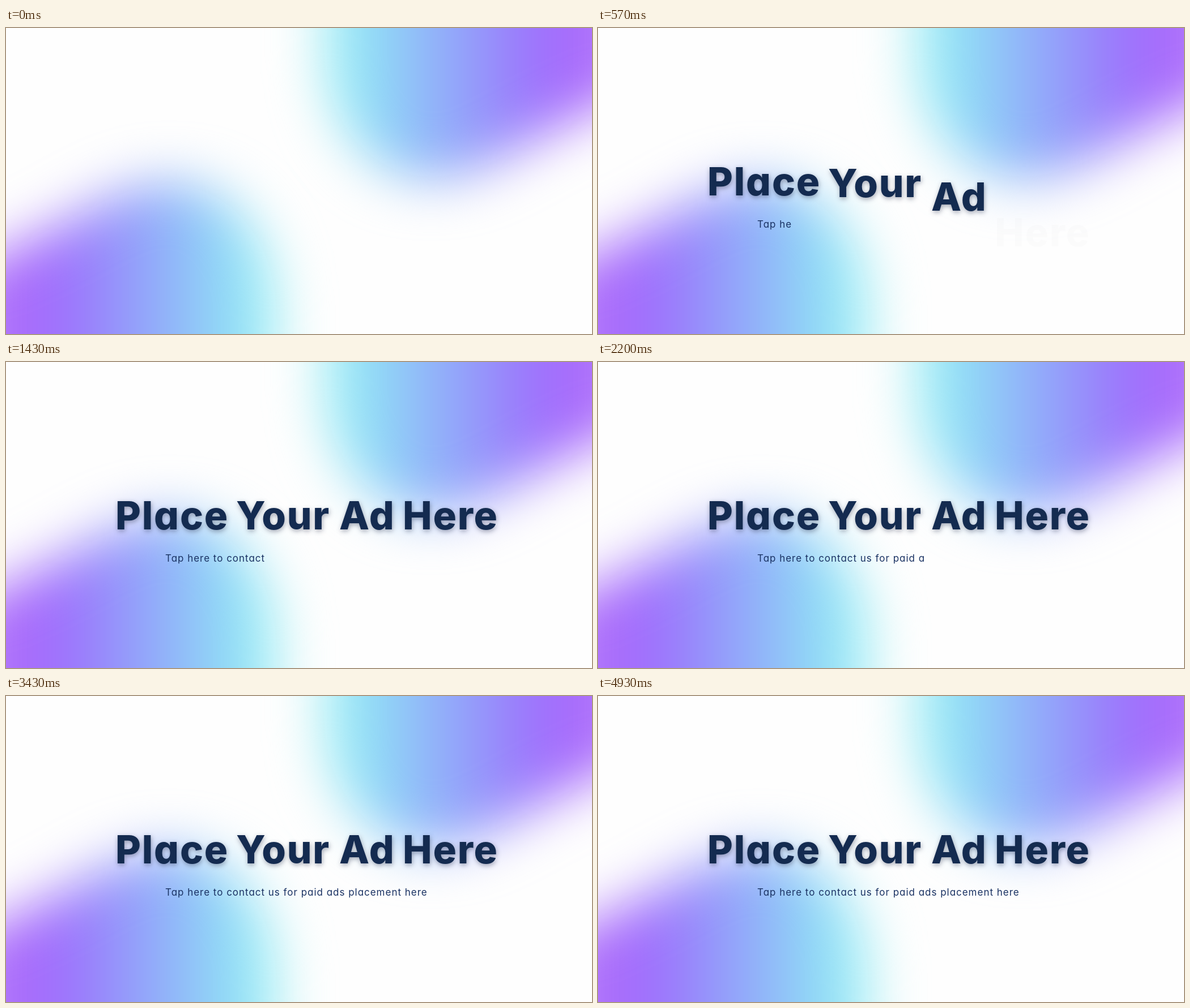
An HTML page without scripts that plays this animation: 1034 by 541 pixels, repeating every 5 s.

```html
<!DOCTYPE html>
<html lang="en">
<head>
<meta charset="utf-8">
<title>Place Your Ad Here</title>
<style>
  /* Elapsed milliseconds; every moving part is derived from it. */
  @property --clock { syntax: "<number>"; inherits: true; initial-value: 0; }
  @keyframes tick { to { --clock: 5000; } }

  html, body { margin: 0; width: 100%; height: 100%; overflow: hidden; background: #fefefe; }
  svg { display: block; width: 1034px; height: 541px; animation: tick 5s linear infinite; }
  text { font-family: Inter, "Open Sans", sans-serif; font-feature-settings: "cv11"; }

  .headline text {
    --progress: clamp(0, (var(--clock) - 120 - 150 * var(--n)) / 450, 1);
    --rest: (1 - var(--progress));
    font-size: 69px; font-weight: 800; letter-spacing: 1.8px; fill: #142b50;
    filter: drop-shadow(1px 3px 4px rgb(20 30 60 / .38));
    transform: translateY(calc(91px * var(--rest) * var(--rest) * var(--rest)));
    opacity: calc(4 * var(--progress));
  }

  .caption { font-size: 17px; letter-spacing: .97px; fill: #1a3263; }
  .caption tspan tspan {
    fill-opacity: clamp(0, var(--clock) - 260 - 60 * (var(--start) + var(--i)), 1);
  }
  .caption tspan :nth-child(1) { --i: 0; }
  .caption tspan :nth-child(2) { --i: 1; }
  .caption tspan :nth-child(3) { --i: 2; }
  .caption tspan :nth-child(4) { --i: 3; }
  .caption tspan :nth-child(5) { --i: 4; }
  .caption tspan :nth-child(6) { --i: 5; }
  .caption tspan :nth-child(7) { --i: 6; }
  .caption tspan :nth-child(8) { --i: 7; }
  .caption tspan :nth-child(9) { --i: 8; }
</style>
</head>
<body>
<svg viewBox="0 0 1034 541">
  <defs>
    <linearGradient id="hues" gradientUnits="userSpaceOnUse" x1="0" y1="0" x2="520" y2="0">
      <stop offset="0" stop-color="#b070fa"/>
      <stop offset=".15" stop-color="#a06afd"/>
      <stop offset=".3" stop-color="#9886fb"/>
      <stop offset=".48" stop-color="#92a8fa"/>
      <stop offset=".64" stop-color="#90c4f8"/>
      <stop offset=".78" stop-color="#90e2f5"/>
      <stop offset="1" stop-color="#a8fbf3"/>
    </linearGradient>
    <filter id="soft" filterUnits="userSpaceOnUse" x="-300" y="0" width="1100" height="1000" color-interpolation-filters="sRGB">
      <feGaussianBlur stdDeviation="47"/>
    </filter>
    <path id="blob" fill="url(#hues)" filter="url(#soft)"
      d="M-75 750V425C0 396 60 368 130 328C200 290 240 272 290 272C390 272 472 360 478 480V750Z"/>
  </defs>

  <use href="#blob"/>
  <use href="#blob" transform="rotate(180 519 270)"/>

  <g class="headline">
    <text x="193" y="296" style="--n:0">Place</text>
    <text x="406" y="296" style="--n:1">Your</text>
    <text x="588" y="296" style="--n:2">Ad</text>
    <text x="700" y="296" style="--n:3">Here</text>
  </g>

  <text class="caption" x="281" y="353">
    <tspan style="--start:0"><tspan>T</tspan><tspan>a</tspan><tspan>p</tspan></tspan>
    <tspan style="--start:4"><tspan>h</tspan><tspan>e</tspan><tspan>r</tspan><tspan>e</tspan></tspan>
    <tspan style="--start:9"><tspan>t</tspan><tspan>o</tspan></tspan>
    <tspan style="--start:12"><tspan>c</tspan><tspan>o</tspan><tspan>n</tspan><tspan>t</tspan><tspan>a</tspan><tspan>c</tspan><tspan>t</tspan></tspan>
    <tspan style="--start:20"><tspan>u</tspan><tspan>s</tspan></tspan>
    <tspan style="--start:23"><tspan>f</tspan><tspan>o</tspan><tspan>r</tspan></tspan>
    <tspan style="--start:27"><tspan>p</tspan><tspan>a</tspan><tspan>i</tspan><tspan>d</tspan></tspan>
    <tspan style="--start:32"><tspan>a</tspan><tspan>d</tspan><tspan>s</tspan></tspan>
    <tspan style="--start:36"><tspan>p</tspan><tspan>l</tspan><tspan>a</tspan><tspan>c</tspan><tspan>e</tspan><tspan>m</tspan><tspan>e</tspan><tspan>n</tspan><tspan>t</tspan></tspan>
    <tspan style="--start:46"><tspan>h</tspan><tspan>e</tspan><tspan>r</tspan><tspan>e</tspan></tspan>
  </text>
</svg>
</body>
</html>
```
